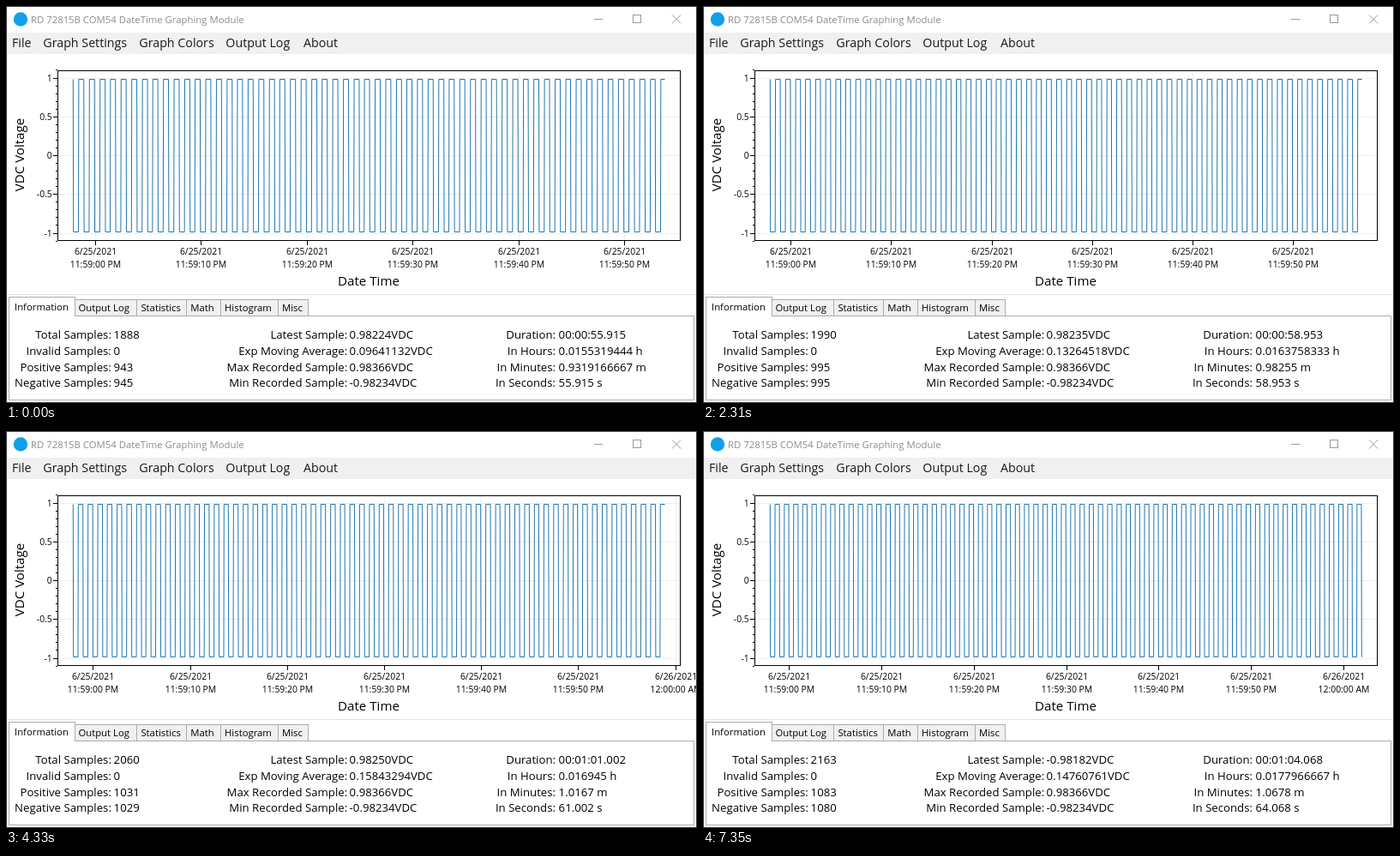
Write an HTML page that moves like this. It is 806 px wide and 463 px high and loops after 8000 ms.

```html
<!DOCTYPE html>
<html lang="en">
<head>
<meta charset="utf-8">
<title>DateTime Graphing Module</title>
<style>
html, body { margin: 0; width: 100%; height: 100%; overflow: hidden; background: #fff; }
svg { display: block; width: 806px; height: 463px; font-family: "Open Sans", "Noto Sans", sans-serif; }
.crisp { shape-rendering: crispEdges; }
</style>
</head>
<body>
<svg id="stage" viewBox="0 0 806 463" xmlns="http://www.w3.org/2000/svg"></svg>
<script>
const LOOP = 8000;
const LEFT = 78.3, SPAN = 690.3;     // trace extent in px
const LEAD = 2.09;                   // seconds from first sample to 11:59:00 PM
const MID = 174.5, UNIT = 90.5;      // 0 V position, px per volt
const HIGH = 85.5, LOW = 263.5;
const BLACK = '#000';

// [start ms, duration s, samples, positive, latest, moving average]
const STATES = [
  [0, 55.915, 1888, 943, '0.98224', '0.09641132'],
  [300, 56.921, 1922, 961, '0.98224', '0.11273846'],
  [1300, 57.935, 1956, 978, '0.98224', '0.1284759'],
  [2310, 58.953, 1990, 995, '0.98235', '0.13264518'],
  [3320, 59.979, 2025, 1013, '0.98245', '0.13683071'],
  [4330, 61.002, 2060, 1031, '0.98250', '0.15843294'],
  [5330, 62.024, 2094, 1049, '0.98255', '0.18003237'],
  [6340, 63.061, 2129, 1066, '-0.98198', '0.15068'],
  [7350, 64.068, 2163, 1083, '-0.98182', '0.14760761']
];

const stage = document.getElementById('stage');

function add(tag, attrs, parent = stage) {
  const el = document.createElementNS('http://www.w3.org/2000/svg', tag);
  for (const k in attrs) el.setAttribute(k, attrs[k]);
  parent.appendChild(el);
  return el;
}

function text(str, x, y, size, anchor = 'start', fill = BLACK, parent = stage) {
  const el = add('text', { x, y, 'font-size': size, 'text-anchor': anchor, fill }, parent);
  el.textContent = str;
  return el;
}

function rect(x, y, width, height, fill, stroke = 'none') {
  return add('rect', { x, y, width, height, fill, stroke, class: 'crisp' });
}

function path(d, stroke, crisp = true, parent = stage) {
  return add('path', { d, stroke, fill: 'none', 'stroke-width': 1, class: crisp ? 'crisp' : '' }, parent);
}

// Window chrome
rect(0, 0, 806, 463, '#fff');
add('circle', { cx: 17, cy: 15.5, r: 8.2, fill: '#12a0e8' });
text('RD 72815B COM54 DateTime Graphing Module', 29, 20, 11.33, 'start', '#8c8c8c');
path('M686 15.5H696M731.5 10.5H740.5V19.5H731.5Z', '#999');
path('M777 10.5L787 20.5M787 10.5L777 20.5', '#999', false);
rect(0, 31, 806, 25, '#f0f0f0');
[['File', 7], ['Graph Settings', 43.3], ['Graph Colors', 155.3], ['Output Log', 256.3], ['About', 347]]
  .forEach(([s, x]) => text(s, x, 48, 14.25, 'start', '#1a1a1a'));

// Plot: grid, trace, frame and axes
const yOf = v => Math.round(MID - v * UNIT - 0.5) + 0.5;
let gridY = '', ticksY = '';
for (let i = -11; i <= 11; i++) {
  const major = i % 5 === 0, y = yOf(i / 10);
  ticksY += `M${major ? 55 : 58} ${y}H60`;
  if (major) {
    gridY += `M60 ${y}H787`;
    text(String(i / 10), 53.8, y + 3.5, 10.4, 'end');
  }
}
path(gridY, '#efefef');
const gridX = path('', '#efefef');
const trace = path('', '#1f77b4', false);
path(ticksY, BLACK);
const ticksX = path('', BLACK);
rect(60.5, 75.5, 726, 198, 'none', BLACK);
const labels = add('g', {});
text('Date Time', 423, 325.5, 15.1, 'middle');
text('VDC Voltage', 0, 0, 15.1, 'middle').setAttribute('transform', 'translate(21 173.5) rotate(-90)');

// Tabs
path('M1 336.5H805', '#e3e3e3');
rect(3.5, 361.5, 799, 98, '#fff', '#acacac');
[['Output Log', 80, 152, 84.4], ['Statistics', 152, 210, 157.4], ['Math', 210, 250, 215.2],
  ['Histogram', 250, 317, 255], ['Misc', 317, 352, 322]].forEach(([s, a, b, x]) => {
  rect(a + 0.5, 342.5, b - a, 19, '#f0f0f0', '#acacac');
  text(s, x, 356, 11.33);
});
rect(3.5, 339.5, 77, 22, '#fff', '#acacac');
rect(4, 361, 76, 1, '#fff');
text('Information', 10, 355, 11.33);

// Statistics, three columns
const ROWS = [388, 407, 425.5, 444];
const values = [
  [122.9, 125.6, 'Total Samples:', 'Invalid Samples:', 'Positive Samples:', 'Negative Samples:'],
  [398.2, 400.6, 'Latest Sample:', 'Exp Moving Average:', 'Max Recorded Sample:', 'Min Recorded Sample:'],
  [641, 644.6, 'Duration:', 'In Hours:', 'In Minutes:', 'In Seconds:']
].flatMap(([end, start, ...names]) => names.map((name, i) => {
  text(name, end, ROWS[i], 13.2, 'end');
  return text('', start, ROWS[i], 13.2);
}));

rect(0.5, 0.5, 805, 462, 'none', '#3a3a3a');

const trim = n => String(+n.toFixed(10));

function clock(s) {
  const m = Math.floor(s / 60);
  return `00:${String(m).padStart(2, '0')}:${(s - m * 60).toFixed(3).padStart(6, '0')}`;
}

// 1 Hz square wave whose edges fall between two neighbouring samples
function wave(dur, count) {
  const dt = dur / (count - 1), scale = SPAN / dur;
  const x = t => (LEFT + t * scale).toFixed(2);
  let d = `M${x(0)} ${HIGH}`, high = true;
  for (let edge = 0.025; edge < dur; edge += 0.5) {
    const before = Math.floor(edge / dt) * dt;
    high = !high;
    d += `H${x(before)}L${x(Math.min(before + dt, dur))} ${high ? HIGH : LOW}`;
  }
  return d + `H${x(dur)}`;
}

function drawTimeAxis(dur) {
  let grid = '', ticks = '';
  labels.replaceChildren();
  for (let s = 0; s <= 60; s += 10) {
    const pos = 78 + (LEAD + s) * 690.5 / dur;
    if (pos > 786) break;
    const x = Math.round(pos - 0.23) + 0.5;
    grid += `M${x} 76V273`;
    ticks += `M${x} 274V279`;
    const next = s === 60;
    text(next ? '6/26/2021' : '6/25/2021', x, 290, 10.4, 'middle', BLACK, labels);
    text(next ? '12:00:00 AM' : `11:59:${String(s).padStart(2, '0')} PM`, x, 305, 10.4, 'middle', BLACK, labels);
  }
  gridX.setAttribute('d', grid);
  ticksX.setAttribute('d', ticks);
}

let shown = null;
function render(ms) {
  const state = STATES.filter(s => s[0] <= ms).pop();
  if (state === shown) return;
  shown = state;
  const [, dur, total, positive, latest, average] = state;
  trace.setAttribute('d', wave(dur, total));
  drawTimeAxis(dur);
  [total, 0, positive, total - positive,
    latest + 'VDC', average + 'VDC', '0.98366VDC', '-0.98234VDC',
    clock(dur), trim(dur / 3600) + ' h', trim(dur / 60) + ' m', trim(dur) + ' s'
  ].forEach((v, i) => { values[i].textContent = v; });
}

const begin = performance.now();
function tick() {
  render((performance.now() - begin) % LOOP);
  requestAnimationFrame(tick);
}
render(0);
requestAnimationFrame(tick);
</script>
</body>
</html>
```
